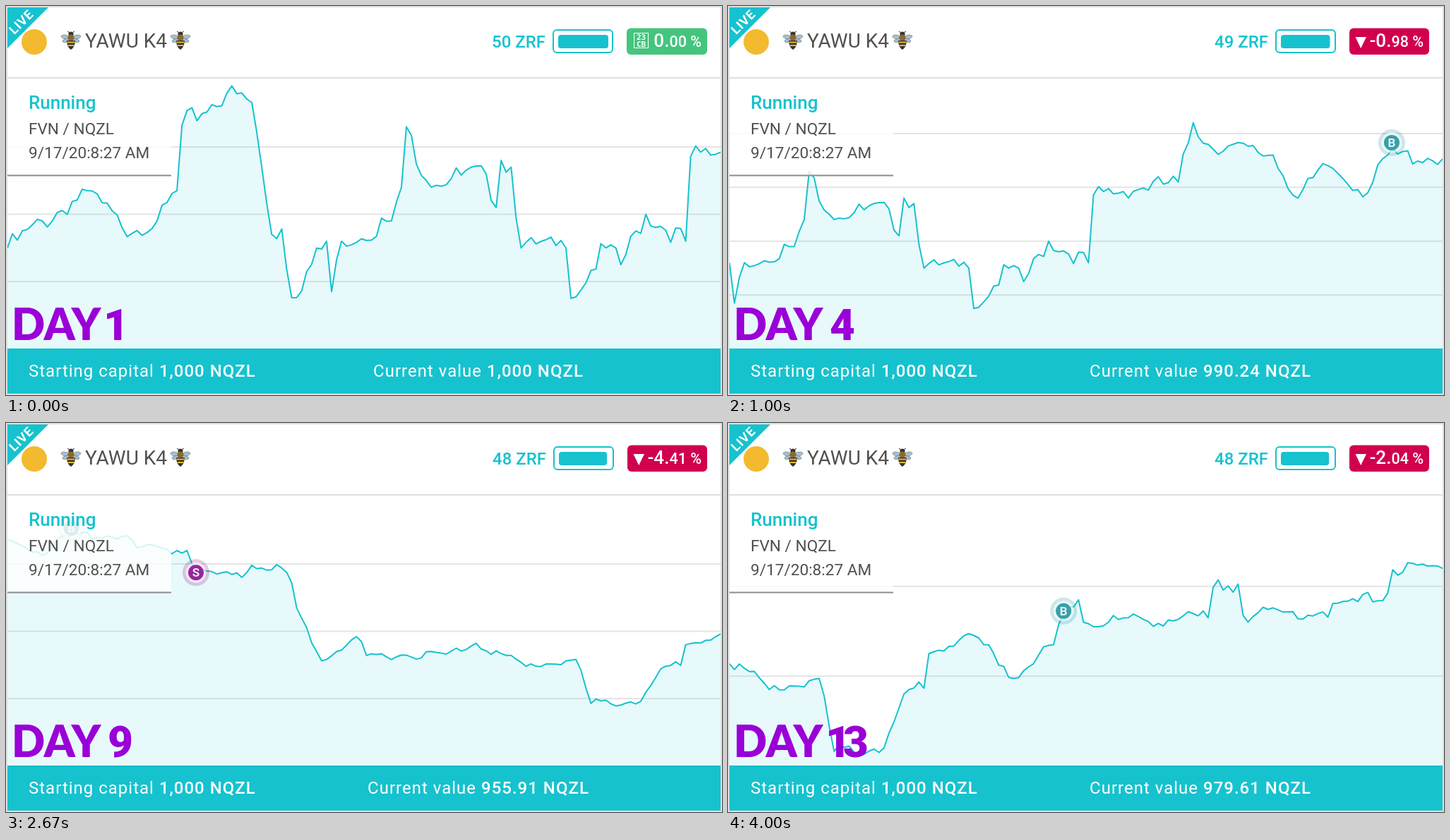
Recreate the animation shown at these times as an HTML page. Size 1014 px wide and 552 px high, loop 4.33 s.

```html
<!DOCTYPE html>
<html lang="en">
<head>
<meta charset="utf-8">
<title>Live strategy chart</title>
<style>
  html, body { margin: 0; width: 100%; height: 100%; overflow: hidden; background: #fff; }
  svg { display: block; width: 1014px; height: 552px; font-family: Roboto, sans-serif; }
  .medium { font-weight: 500; }
  .teal { fill: #16c2ce; }
  .dark { fill: #505050; }
  .white { fill: #fff; }
  .footer { font-size: 24px; letter-spacing: 1px; }
  #grid { stroke: #e4e4e4; stroke-width: 2; }
  #line { fill: none; stroke: #16c2ce; stroke-width: 2; stroke-linejoin: round; }
  #day { font: 900 62px Lato, sans-serif; fill: #9a00d7; }
  #digits { font: 900 62px Roboto, sans-serif; }
</style>
</head>
<body>
<svg viewBox="0 0 1014 552">
  <defs>
    <g id="bee">
      <g fill="#a8bfcc" stroke="#71848f" stroke-width=".7">
        <ellipse cx="-8" cy="-4" rx="6" ry="2.8" transform="rotate(12 -8 -4)"/>
        <ellipse cx="8" cy="-4" rx="6" ry="2.8" transform="rotate(-12 8 -4)"/>
        <ellipse cx="-7" cy="1" rx="5" ry="2.3" transform="rotate(-15 -7 1)"/>
        <ellipse cx="7" cy="1" rx="5" ry="2.3" transform="rotate(15 7 1)"/>
      </g>
      <path d="M-2-9Q-3-12-5-12M2-9Q3-12 5-12" fill="none" stroke="#333"/>
      <circle cy="-8" r="3.6" fill="#333"/>
      <circle cy="-3" r="4.6" fill="#8a6a2c"/>
      <path d="M-6 1Q-6 10 0 14Q6 10 6 1Z" fill="#333"/>
      <path d="M-5.5 3.5H5.5M-4.5 8H4.5" stroke="#f2b632" stroke-width="2"/>
    </g>
  </defs>

  <rect width="1014" height="552" fill="#fff"/>
  <path id="grid"/>
  <path id="area" fill="#16c2ce" fill-opacity=".1"/>
  <path id="line"/>
  <g id="trades"></g>

  <rect x="2" y="103" width="232" height="137" fill="#fff" fill-opacity=".82"/>
  <path d="M2 240.5H234" stroke="#8e8a90" stroke-width="2"/>
  <text class="teal medium" x="32" y="146" font-size="26">Running</text>
  <g class="dark" font-size="22.6">
    <text x="32" y="182">FVN / NQZL</text>
    <text x="32" y="216">9/17/20:8:27 AM</text>
  </g>

  <path d="M2 102H1012" stroke="#dedede" stroke-width="2"/>
  <path class="teal" d="M2 2H60L2 60Z"/>
  <circle cx="40" cy="51" r="18" fill="#f3ba2f"/>
  <text class="white" font-size="18" font-weight="700" letter-spacing=".8" text-anchor="middle"
        transform="translate(26 27) rotate(-45)">LIVE</text>
  <use href="#bee" x="92" y="48"/>
  <use href="#bee" x="247" y="48"/>
  <text class="dark" x="112" y="58.500" font-size="28">YAWU K4</text>

  <g id="battery">
    <text id="credit" class="teal medium" x="764" y="58.500" font-size="24" text-anchor="end"></text>
    <rect x="775" y="34" width="84" height="32" rx="5" fill="none" stroke="#16c2ce" stroke-width="2"/>
    <rect id="charge" class="teal" x="782" y="41" height="19" rx="4"/>
  </g>

  <rect id="badge" y="31.500" height="37.500" rx="6"/>
  <g id="flat" class="white" font-family="Roboto Mono, DejaVu Sans Mono, monospace" font-size="11" font-weight="700" text-anchor="middle">
    <rect x="889.500" y="38.500" width="20" height="21" fill="none" stroke="#fff"/>
    <text x="899.500" y="48">23</text>
    <text x="899.500" y="58">CB</text>
  </g>
  <path id="down" class="white" d="M888.500 44H904L896.200 60Z"/>
  <text class="white medium" x="985" y="58" text-anchor="end" font-size="26"><tspan id="whole"></tspan><tspan id="cents" font-size="21.500"></tspan></text>

  <rect class="teal" x="2" y="486" width="1010" height="64"/>
  <text class="white footer" x="32" y="526">Starting capital <tspan class="medium">1,000 NQZL</tspan></text>
  <text class="white footer" x="669" y="526" text-anchor="middle">Current value <tspan id="value" class="medium"></tspan></text>

  <text id="day" x="8" y="474">DAY<tspan id="digits"></tspan></text>
  <rect x="1" y="1" width="1012" height="550" fill="none" stroke="#dedede" stroke-width="2"/>
</svg>

<script>
const LOOP = 4330, SPAN = 143, STEP = 1010 / SPAN, BASE = 486.5, HEIGHT = 382;
const $ = id => document.getElementById(id);

// Turning points of the hourly price: hour, price
const turns = [
  0,365, 16,373.5, 23,368, 30,369, 34,373.5, 35,383.2, 44,388, 49,386.6, 53,367, 55,367.8,
  57,357.6, 64,366, 65,358.5, 67,366, 77,369, 79,374, 80,383, 84,375, 96,376, 98,371,
  99,378, 101,377, 103,365, 112,365, 113,357.5, 120,365, 123,362.5, 128,370, 136,366, 137,378.6,
  154,381, 157,392, 160,388, 173,386, 178,378, 184,384, 192,379, 196,386, 208,385.4, 210,381,
  220,380, 222,372, 231,370, 233,374.5, 239,373.5, 241,368, 242,358.6, 247,339, 254,348, 256,341,
  272,341.5, 278,345.5, 288,337, 298,339.5, 301,323.2, 311,324, 316,337, 319,337.3, 320,345, 327,349,
  333,345, 337,339.5, 345,347, 347,354, 350,357, 351,352, 376,353, 377,359.8, 382,360.5, 383,353.5,
  399,354.3, 412,358.5, 413,363.7, 423,364
];
const trades = [
  { hour: 196.8, price: 388.3, side: 'B', color: '#36a0a9' },
  { hour: 221.8, price: 371.8, side: 'S', color: '#98259c' },
  { hour: 347, price: 354.5, side: 'B', color: '#36a0a9' }
];
const values = [1000, 1000, 1000, 990.24, 955.91, 955.91, 955.91, 955.91, 955.91, 949.91, 949.19, 954.85, 979.61];
// Price axis in force from a given day on
const axes = [
  { from: 1, low: 350, tick: 10, rows: 4 },
  { from: 2, low: 350, tick: 10, rows: 5 },
  { from: 6, low: 320, tick: 20, rows: 4 },
  { from: 8, low: 300, tick: 25, rows: 4 },
  { from: 11, low: 320, tick: 20, rows: 3 }
];

// Small repeatable jitter between turning points
const jitter = i => 1.7 * ((Math.sin(i * 12.9898) * 43758.5453) % 1);
const prices = [turns[1]];
for (let k = 2; k < turns.length; k += 2) {
  const [h0, p0, h1, p1] = turns.slice(k - 2, k + 2);
  for (let h = h0 + 1; h <= h1; h++)
    prices.push(p0 + (p1 - p0) * (h - h0) / (h1 - h0) + (h < h1 ? jitter(h) : 0));
}

function drawChart(day) {
  const start = Math.max(0, 24 * (day - 1) - 8);
  const { low, tick, rows } = axes.findLast(a => a.from <= day);
  const x = hour => 2 + STEP * (hour - start);
  const y = price => BASE - (price - low) / (tick * rows) * HEIGHT;

  let grid = '';
  for (let r = 1; r < rows; r++) grid += `M2 ${y(low + r * tick)}H1012`;
  $('grid').setAttribute('d', grid);

  const points = prices.slice(start, start + SPAN + 1)
    .map((p, i) => `${x(start + i).toFixed(1)} ${y(p).toFixed(1)}`).join('L');
  $('line').setAttribute('d', 'M' + points);
  $('area').setAttribute('d', `M2 486L${points}L1012 486Z`);

  $('trades').innerHTML = trades.filter(t => t.hour <= start + SPAN).map(t => `
    <g transform="translate(${x(t.hour)} ${y(t.price)})" fill="${t.color}">
      <circle r="19" fill-opacity=".25"/>
      <circle r="14.5" fill="#fff" fill-opacity=".65"/>
      <circle r="11"/>
      <text y="6" font-size="17" font-weight="700" text-anchor="middle" fill="#e4f2f4">${t.side}</text>
    </g>`).join('');
}

function drawLabels(day) {
  const value = values[day - 1], flat = value === 1000;
  const credit = day < 3 ? 50 : day < 8 ? 49 : 48;
  const [whole, cents] = (value / 10 - 100).toFixed(2).split('.');

  $('credit').textContent = credit + ' ZRF';
  $('charge').setAttribute('width', credit * 1.42);
  $('battery').setAttribute('transform', `translate(${flat ? 0 : 1})`);
  $('badge').setAttribute('x', flat ? 879 : 880);
  $('badge').setAttribute('width', flat ? 114 : 113);
  $('badge').setAttribute('fill', flat ? '#44c57d' : '#d1004f');
  $('flat').style.display = flat ? '' : 'none';
  $('down').style.display = flat ? 'none' : '';
  $('whole').textContent = whole + '.';
  $('cents').textContent = cents + ' %';
  $('value').textContent = value.toLocaleString('en') + ' NQZL';

  const digits = String(day);
  $('digits').setAttribute('x', [...digits].map((d, i) => (d === '1' ? 138 : 144) + 19 * i).join(' '));
  $('digits').textContent = digits;
}

let shown = 0;
function frame() {
  const t = performance.now() % LOOP;
  const day = 1 + Math.floor(Math.floor(t / 10) * 0.03 + 0.012);
  if (day !== shown) {
    drawChart(day);
    drawLabels(day);
    shown = day;
  }
  requestAnimationFrame(frame);
}
frame();
</script>
</body>
</html>
```
